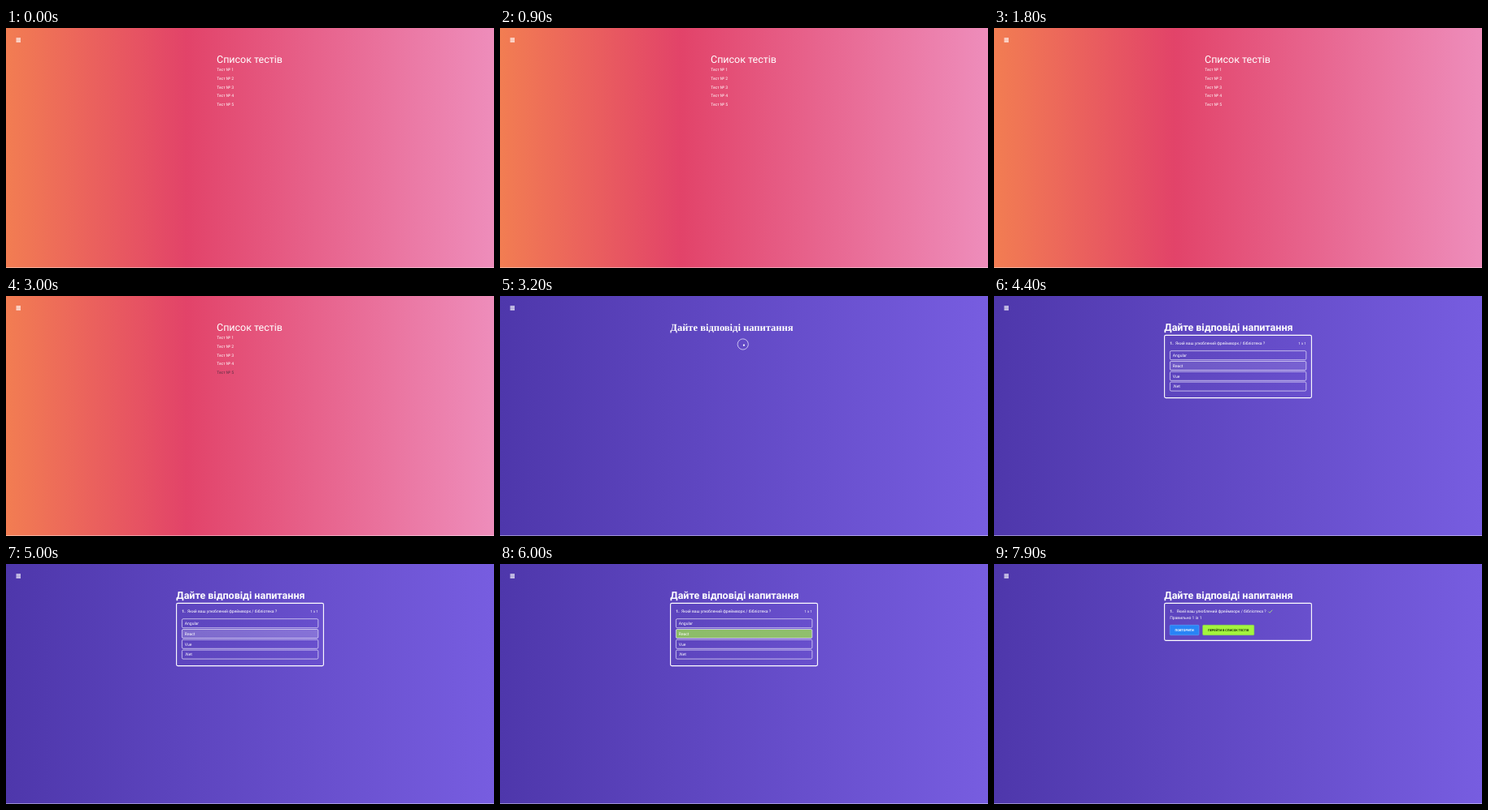
Recreate the animation shown at these times as an HTML page. Size 600 by 296 pixels, loop 8000 ms.

```html
<!DOCTYPE html>
<html lang="uk">
<head>
<meta charset="utf-8">
<title>Тести</title>
<style>
  html, body { margin: 0; width: 100%; height: 100%; overflow: hidden; }
  svg { display: block; width: 100%; height: 100%; }
  text { font: 5px Roboto, sans-serif; fill: #fff; text-rendering: geometricPrecision; white-space: pre; }
  .title { font-size: 12.5px; }
  .bold { font-weight: 700; }
  .frame { fill: none; stroke: #fff; stroke-width: 1.1; }
  .answer { stroke: #e4dffa; stroke-width: .75; }
  .button { font-size: 3.9px; font-weight: 700; text-anchor: middle; }
</style>
</head>
<body>
<svg viewBox="0 0 600 296" preserveAspectRatio="none">
  <defs>
    <linearGradient id="warm">
      <stop stop-color="#f27d52"/>
      <stop offset=".37" stop-color="#e24369"/>
      <stop offset="1" stop-color="#ee8dbb"/>
    </linearGradient>
    <linearGradient id="violet">
      <stop stop-color="#4e37ab"/>
      <stop offset="1" stop-color="#775de0"/>
    </linearGradient>
  </defs>

  <rect id="background" width="600" height="296"/>
  <path d="M0 295.6H600" stroke="#fff" stroke-opacity=".6" stroke-width=".8"/>
  <path d="M12.5 12.9h5.5M12.5 14.9h5.5M12.5 16.9h5.5" stroke="#fff" stroke-width="1.1"/>

  <g id="list">
    <text class="title" x="259" y="42.6">Список тестів</text>
  </g>

  <g id="quiz">
    <text id="heading" class="title bold" x="209.3" y="42.5">Дайте відповіді напитання</text>
    <g id="loader">
      <circle cx="298.7" cy="59.5" r="6.6" fill="none" stroke="#e3ddfb" stroke-width=".8"/>
      <circle id="dot" r="1.1" fill="#fff"/>
    </g>
    <g id="question">
      <rect class="frame" x="209.6" y="48.4" width="180.8" height="77.2" rx="1.6"/>
      <text class="bold" x="216.3" y="60.3">1.</text>
      <text x="223" y="60.3">Який ваш улюблений фреймворк / бібліотека ?</text>
      <text x="383.6" y="59.8" text-anchor="end" style="font-size:4.4px">1 з 1</text>
    </g>
    <g id="result">
      <rect class="frame" x="209.6" y="48.4" width="180.8" height="46" rx="1.6"/>
      <text class="bold" x="216.3" y="60.3">1.</text>
      <text x="224.4" y="60.3">Який ваш улюблений фреймворк / бібліотека ?</text>
      <path d="M337.3 58.6l1.6 1.6 3.4-3.4" fill="none" stroke="#a9dd85" stroke-width=".9"/>
      <text x="216.2" y="68.1">Правильно 1 із 1</text>
      <rect x="216.2" y="75.3" width="35.8" height="12.4" rx="1.2" fill="#2884f6" stroke="#68aaf7" stroke-width=".5"/>
      <text class="button" x="234.1" y="83">ПОВТОРИТИ</text>
      <rect x="256.6" y="75.3" width="63.2" height="12.4" rx="1.2" fill="#a4f53d" stroke="#7fd24a" stroke-width=".5"/>
      <text class="button" x="288.2" y="83" style="font-size:3.8px;fill:#173008">ПЕРЕЙТИ В СПИСОК ТЕСТІВ</text>
    </g>
  </g>
</svg>

<script>
const $ = id => document.getElementById(id);
const LOOP = 8000, OPEN = 3150, FONT_READY = 3300, LOADED = 3450, RESULT = 6350;

function add(parent, tag, attributes, content = '') {
  const node = document.createElementNS('http://www.w3.org/2000/svg', tag);
  for (const [key, value] of Object.entries(attributes)) node.setAttribute(key, value);
  node.textContent = content;
  return parent.appendChild(node);
}

const tests = [1, 2, 3, 4, 5].map((n, i) =>
  add($('list'), 'text', { x: 259.2, y: 53.4 + i * 10.65 }, `Тест № ${n}`));

const answers = ['Angular', 'React', 'Vue', '.Net'].map((label, i) => {
  const y = 67.7 + i * 12.8;
  const box = add($('question'), 'rect',
    { class: 'answer', x: 216.4, y, width: 167.4, height: 11, rx: 1.5, fill: 'transparent' });
  add($('question'), 'text', { x: 219.8, y: y + 7.2 }, label);
  return box;
});

const show = (id, visible) => $(id).style.display = visible ? '' : 'none';
const progress = (t, start, length) => Math.min(1, Math.max(0, (t - start) / length));
const mix = (from, to, p) => from.map((v, i) => v + (to[i] - v) * p);
const rgba = color => `rgba(${color.join(',')})`;

function draw(t) {
  const inQuiz = t >= OPEN;
  $('background').setAttribute('fill', inQuiz ? 'url(#violet)' : 'url(#warm)');
  show('list', !inQuiz);
  show('quiz', inQuiz);
  show('loader', t < LOADED);
  show('question', t >= LOADED && t < RESULT);
  show('result', t >= RESULT);

  tests[4].style.fill = rgba(mix([255, 255, 255, 1], [92, 48, 68, 1], progress(t, 2380, 240)));
  $('heading').style.fontFamily = t < FONT_READY ? 'Liberation Serif, serif' : '';

  const angle = Math.PI / 4 + (t - 3200) / 1000 * 2 * Math.PI;
  $('dot').setAttribute('cx', 298.7 + 1.7 * Math.cos(angle));
  $('dot').setAttribute('cy', 59.5 + 1.7 * Math.sin(angle));

  const hover = mix([255, 255, 255, 0], [255, 255, 255, .2], progress(t, 4250, 300));
  const fill = mix(hover, [161, 240, 69, .7], progress(t, 5350, 300));
  answers[1].style.fill = rgba(fill);
}

const start = performance.now();
function tick() {
  draw((performance.now() - start) % LOOP);
  requestAnimationFrame(tick);
}
tick();
</script>
</body>
</html>
```
